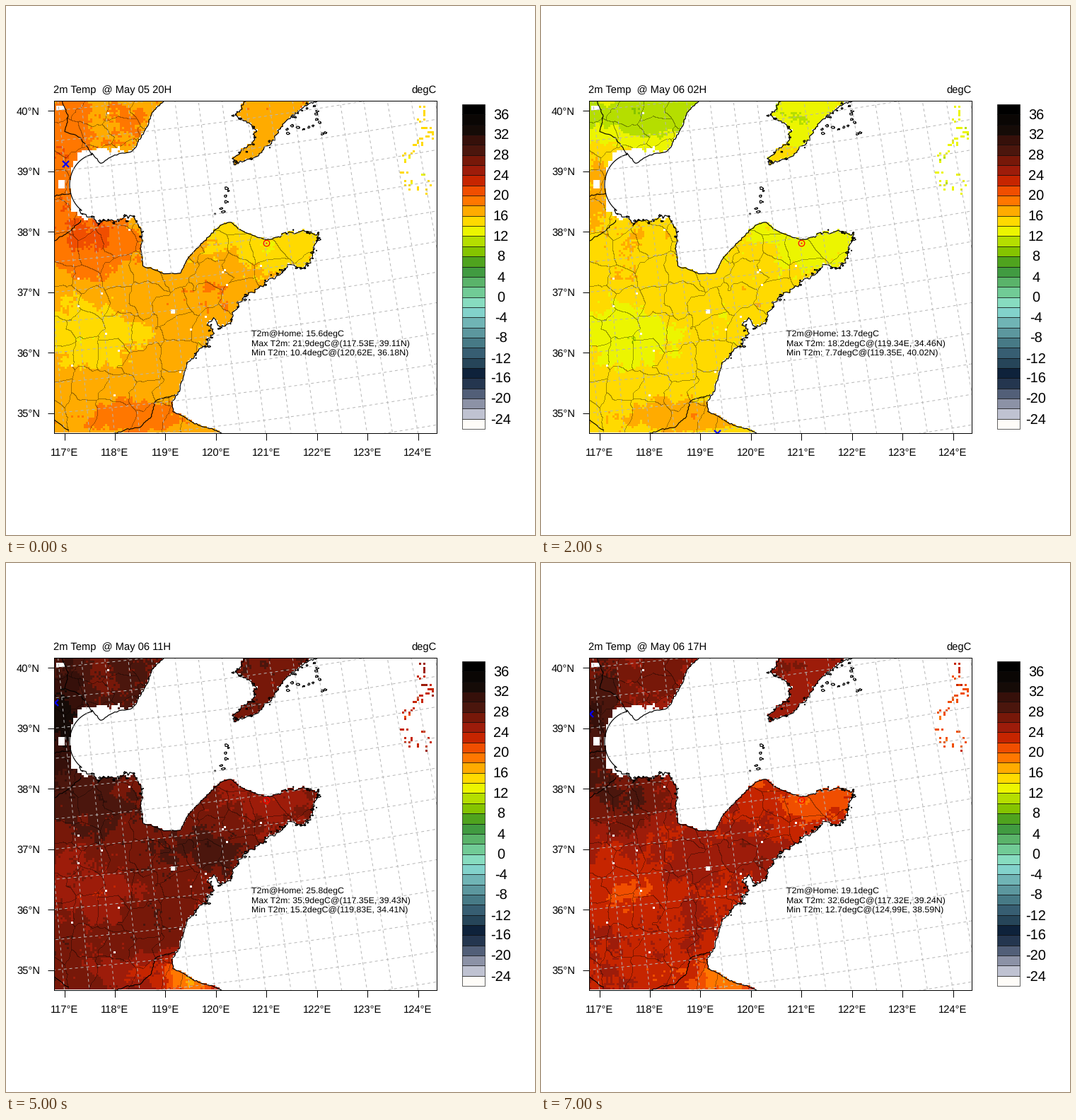
Animation of 748 by 748 pixels, one loop 8 s. Source, as a matplotlib script:

```python
import numpy as np
import matplotlib.pyplot as plt
from matplotlib.animation import FuncAnimation
from matplotlib.colors import to_rgb
from matplotlib.patches import Rectangle
from matplotlib.path import Path

SIZE, DPI, PX = 748, 100, 0.72          # PX: points per pixel
LEFT, TOP, CELL, NX, NY = 68, 133, 3, 180, 157
RIGHT, BOTTOM = LEFT + CELL * NX, TOP + CELL * NY
EXTENT = (LEFT, RIGHT, BOTTOM, TOP)

plt.rcParams["font.family"] = "Liberation Sans"
plt.rcParams["text.hinting"] = "none"
rng = np.random.default_rng(7)

# Colours from below -24 to above 36 degrees, two degrees each
COLORS = """#fefcf8 #bfc2d1 #8c92a6 #525f78 #24364f #0e223b #264559 #375e72
#477a86 #5c979e #70b4b5 #82d2cb #87dcc0 #71cb96 #5ab36a #419b41 #4fa31e #85c400
#b5de00 #ecf500 #ffda00 #ffab00 #ff7700 #f04e00 #c62500 #9d1c0a #771809 #4b160d
#36100a #150b07 #0a0604 #000000""".split()
PALETTE = np.array([to_rgb(c) for c in COLORS])

# Key points of the coast, clockwise from the top edge
NORTH = [(224, 133), (207, 152), (194, 181), (178, 206), (152, 213), (133, 222), (121, 210)]
DELTA = [(107, 289), (125, 305), (160, 306), (180, 299), (190, 320), (192, 330)]
GULF = [(192, 330), (190, 342), (195, 368), (225, 379), (248, 377), (258, 356),
        (288, 325), (305, 309), (317, 306), (345, 324), (368, 330), (388, 325)]
CAPE = [(388, 325), (404, 318), (443, 322), (436, 338), (434, 358), (420, 372),
        (400, 367), (385, 382), (351, 400), (335, 413), (322, 433), (320, 447)]
INLET = [(320, 447), (302, 454), (295, 441), (283, 450), (295, 461), (277, 487), (256, 506)]
SOUTH = [(256, 506), (245, 545), (233, 560), (236, 573), (263, 588), (304, 604)]
PENINSULA = [(337, 133), (323, 155), (337, 158), (354, 175), (350, 192), (321, 214),
             (323, 226), (352, 212), (376, 192), (390, 172), (404, 155), (440, 133)]
BORDERS = [
    [(77, 133), (88, 155), (84, 178), (104, 185), (121, 210)],
    [(68, 270), (92, 264)],
    [(68, 333), (88, 320), (106, 302)],
    [(68, 584), (88, 600)],
    [(152, 604), (190, 596), (205, 580), (212, 558), (240, 549)],
]
ISLET_CHAINS = [[(395, 177), (432, 166)], [(313, 258), (302, 298)], [(436, 142), (452, 182)]]
FAR_SHORE = [(593, 140), (588, 165), (606, 181), (580, 197), (568, 210), (564, 237)]
LAKES = [(74, 248, 9, 10), (72, 142, 11, 5), (234, 429, 6, 8)]

# Regions: centre x, y, radius x, y, then degrees: steady, by day, by night, evening lag
BASE = (18.9, 9.7, -4.0, -2.0)
REGIONS = {
    "plain": (78, 225, 38, 70, 2.8, 4.2, -0.8, 0.0),
    "north": (140, 155, 300, 48, 0.3, 2.2, -4.6, 0.9),
    "delta": (115, 325, 75, 52, 1.8, 1.4, -1.0, 1.3),
    "ridge": (285, 405, 50, 32, 1.3, -0.2, -1.0, -0.5),
    "hills": (125, 470, 72, 45, -2.3, 0.0, 0.2, 0.0),
    "cape": (385, 335, 95, 40, -1.7, -1.0, -0.2, -0.8),
    "valley": (190, 582, 75, 26, 2.0, -7.0, 0.3, 0.5),
    "shore": (262, 590, 38, 34, -2.0, -7.0, 2.5, 2.0),
    "islands": (585, 215, 50, 80, -3.3, -2.4, 0.3, 0.0),
}

# Home, then highest and lowest value with longitude and latitude, every three hours
READINGS = [
    (15.6, (21.9, 117.53, 39.11), (10.4, 120.62, 36.18)),
    (14.6, (19.8, 117.46, 39.05), (8.9, 119.35, 40.02)),
    (13.7, (18.2, 119.34, 34.46), (7.7, 119.35, 40.02)),
    (14.5, (18.4, 119.34, 34.46), (8.1, 119.35, 40.02)),
    (19.4, (24.4, 117.46, 39.20), (12.7, 124.69, 37.93)),
    (25.8, (35.9, 117.35, 39.43), (15.2, 119.83, 34.41)),
    (24.7, (37.8, 117.32, 39.15), (16.1, 119.57, 34.43)),
    (19.1, (32.6, 117.32, 39.24), (12.7, 124.99, 38.59)),
]


def project(lon, lat):
    """Conic projection to page pixels."""
    rho = 6708 - 85.16 * (lat - 35)
    angle = np.radians(0.6 * (lon - 108.5))
    return np.c_[-516.4 + rho * np.sin(angle), -6107 + rho * np.cos(angle)]


def along(points, n):
    """n evenly spaced places on a polyline."""
    p = np.array(points, float)
    dist = np.r_[0, np.cumsum(np.hypot(*np.diff(p, axis=0).T))]
    at = np.linspace(0, dist[-1], n)
    return np.c_[np.interp(at, dist, p[:, 0]), np.interp(at, dist, p[:, 1])]


def ragged(points, amount):
    """Resample a polyline every few pixels with broad and fine jitter."""
    length = np.hypot(*np.diff(np.array(points, float), axis=0).T).sum()
    n = max(int(length / 2.5), 3)
    broad = along(rng.standard_normal((n // 4 + 2, 2)), n)
    return along(points, n) + amount * (broad + 0.6 * rng.standard_normal((n, 2)))


def noise(size, ny=NY, nx=NX):
    """Random field, smooth over the given number of steps."""
    grid = rng.standard_normal((ny // size + 2, nx // size + 2))
    rows = np.array([np.interp(np.arange(nx) / size, np.arange(grid.shape[1]), r) for r in grid])
    return np.array([np.interp(np.arange(ny) / size, np.arange(grid.shape[0]), c) for c in rows.T]).T


gx, gy = np.meshgrid(LEFT + CELL * (np.arange(NX) + 0.5), TOP + CELL * (np.arange(NY) + 0.5))
terrain = 0.45 * noise(10) + 0.5 * noise(4) + 0.25 * noise(1)


def temperature(hour):
    """Daily cycle of each region on top of the terrain."""
    phase = 2 * np.pi * (hour - 14) / 24
    c = np.cos(phase)
    cycle = np.array([1, max(c, 0), max(-c, 0), np.sin(phase)])
    rough = 0.6 + 0.5 * cycle[1]
    t = cycle @ BASE + rough * (terrain + 0.35 * noise(12) + 0.35 * noise(3))
    for cx, cy, rx, ry, *degrees in REGIONS.values():
        t += cycle @ degrees * np.exp(-((gx - cx) / rx) ** 2 - ((gy - cy) / ry) ** 2)
    return t


def inside(outline):
    return Path(outline).contains_points(np.c_[gx.ravel(), gy.ravel()]).reshape(NY, NX)


arc = np.radians(np.linspace(-102, -235, 40))
bay = np.c_[130 + 40 * np.cos(arc), 253 + 44 * np.sin(arc)]
delta, cape, inlet = ragged(DELTA, 2.2), ragged(CAPE, 1.7), ragged(INLET, 1.7)
coast = np.vstack([ragged(NORTH, 0.8), bay, delta, ragged(GULF, 0.7), cape, inlet,
                   ragged(SOUTH, 0.7)])
peninsula = ragged(PENINSULA, 1.8)


def land_cells():
    mainland = inside(np.vstack([coast, [(LEFT, BOTTOM), (LEFT, TOP)]]))
    land = mainland | inside(peninsula)
    # The data stops short of the bay
    land &= ((gx - 143) / 50) ** 4 + ((gy - 253) / 50) ** 4 > 1 + 0.2 * noise(2)
    for x, y, w, h in LAKES:
        land &= ~((gx > x) & (gx < x + w) & (gy > y) & (gy < y + h))
    land &= rng.random((NY, NX)) > 0.002
    far = np.vstack([along(FAR_SHORE, 44) + rng.normal(0, 3, (44, 2)),
                     rng.uniform((565, 238), (606, 268), (14, 2))])
    cols, rows = ((far - (LEFT, TOP)) / CELL).astype(int).T
    land[rows, cols.clip(0, NX - 1)] = True
    return mainland, land


def county_lines():
    """One-pixel borders between warped nearest-centre regions."""
    y, x = np.mgrid[TOP:BOTTOM, LEFT:RIGHT].astype(float)
    for axis in (x, y):
        axis += 6 * noise(18, *x.shape) + 1.2 * noise(6, *x.shape)
    sx, sy = np.meshgrid(np.arange(75, 450, 42), np.arange(140, 620, 40))
    best, owner = np.full(x.shape, 1e9), np.zeros(x.shape, int)
    for i, (cx, cy) in enumerate(zip(sx.ravel(), sy.ravel())):
        cx, cy = (cx, cy) + rng.uniform(-14, 14, 2)
        d = (x - cx) ** 2 + (y - cy) ** 2
        owner[d < best] = i
        best = np.minimum(best, d)
    edge = np.zeros(x.shape, bool)
    edge[:, :-1] |= owner[:, 1:] != owner[:, :-1]
    edge[:-1] |= owner[1:] != owner[:-1]
    rgba = np.zeros(x.shape + (4,))
    rgba[..., 3] = 0.36 * edge * np.kron(mainland & land, np.ones((CELL, CELL)))
    return rgba


def paint(t):
    idx = np.clip(np.floor((t + 24) / 2).astype(int) + 1, 0, len(COLORS) - 1)
    return np.dstack([PALETTE[idx], land.astype(float)])


mainland, land = land_cells()
hours = 20 + 3 * np.arange(len(READINGS))
images = [paint(temperature(h)) for h in hours]

fig = plt.figure(figsize=(SIZE / DPI, SIZE / DPI), dpi=DPI, facecolor="white")
chart = fig.add_axes([67.5 / SIZE, 1 - 603.5 / SIZE, 541 / SIZE, 470 / SIZE])
page = fig.add_axes([0, 0, 1, 1], zorder=2)
page.set(xlim=(0, SIZE), ylim=(SIZE, 0))
page.axis("off")


def label(x, y, text, px, ha="left"):
    return page.text(x, y, text, fontsize=px * PX, ha=ha, va="baseline")


def line(points, width=1.1, **style):
    chart.plot(*np.transpose(points), lw=width * PX, **{"color": "black", **style})


def islet(x, y, size):
    a = np.linspace(0, 2 * np.pi, 9)
    r = size * rng.uniform(0.4, 1.2, 9)
    r[-1] = r[0]
    line(np.c_[x + 1.3 * r * np.cos(a), y + r * np.sin(a)], 1.2)


heat = chart.imshow(images[0], extent=EXTENT, interpolation="nearest", aspect="auto")
chart.imshow(county_lines(), extent=EXTENT, interpolation="nearest", aspect="auto")
for border in BORDERS:
    line(ragged(border, 0.8))
line(coast, 1.2)
line(peninsula, 1.2)
for chain in ISLET_CHAINS:
    for x, y in along(chain, 7) + rng.normal(0, 3, (7, 2)):
        islet(x, y, rng.uniform(0.8, 2.5))
for shore, count in [(delta, 16), (cape, 32), (inlet, 12), (peninsula, 20)]:
    for x, y in rng.choice(shore, count) + rng.normal(0, 2.5, (count, 2)):
        islet(x, y, rng.uniform(0.4, 1.6))

dashes = dict(color="#b6b6b6", ls=(0, (4, 4)), dash_capstyle="butt")
for lon in np.arange(116.5, 126, 0.5):
    line(project(lon, np.linspace(41, 33.5, 60)), 1, **dashes)
for lat in np.arange(34, 41.5, 0.5):
    line(project(np.linspace(116, 126, 90), lat), 1, **dashes)

chart.plot(368, 335, "o", ms=8.6 * PX, mfc="none", mec="red", mew=1.2 * PX)
chart.plot(368, 335, "o", ms=2 * PX, color="red", mew=0)
cross, = chart.plot([], [], "x", ms=9 * PX, color="blue", mew=2.2 * PX)

lon_x = 82.5 + 71.43 * np.arange(8)
lat_y = 148 + 85.5 * np.arange(6)
chart.set(xlim=(67.5, 608.5), ylim=(603.5, 133.5))
chart.set_xticks(lon_x, [""] * len(lon_x))
chart.set_yticks(lat_y, [""] * len(lat_y))
chart.tick_params(length=9.5 * PX, width=PX)
for spine in chart.spines.values():
    spine.set_linewidth(PX)
for i, x in enumerate(lon_x):
    label(x, 636, f"{117 + i}°E", 14.8, "center")
for i, y in enumerate(lat_y):
    label(48, y + 5.7, f"{40 - i}°N", 14.8, "right")

box = 459 / len(COLORS)
for i, color in enumerate(reversed(COLORS)):
    page.add_patch(Rectangle((645, 139 + i * box), 32, box, fc=color, ec="black", lw=0.6 * PX))
for i, value in enumerate(range(36, -25, -4)):
    label(700, 139 + box * (2 * i + 1) + 7, str(value), 20, "center")

title = label(67, 123, "", 14.8)
label(609, 123, "degC", 14.8, "right")
info = [label(347, 467.8 + 13.6 * i, "", 12.35) for i in range(3)]


def draw(i):
    home, high, low = READINGS[i]
    day, hour = divmod(hours[i], 24)
    heat.set_data(images[i])
    cross.set_data(*project(*high[1:]).T)
    title.set_text(f"2m Temp  @ May {5 + day:02d} {hour:02d}H")
    info[0].set_text(f"T2m@Home: {home}degC")
    for text, name, (value, lon, lat) in zip(info[1:], ("Max", "Min"), (high, low)):
        text.set_text(f"{name} T2m: {value}degC@({lon:.2f}E, {lat:.2f}N)")
    return [heat, cross, title, *info]


anim = FuncAnimation(fig, draw, frames=len(READINGS), interval=1000, repeat=True)
plt.show()
```
